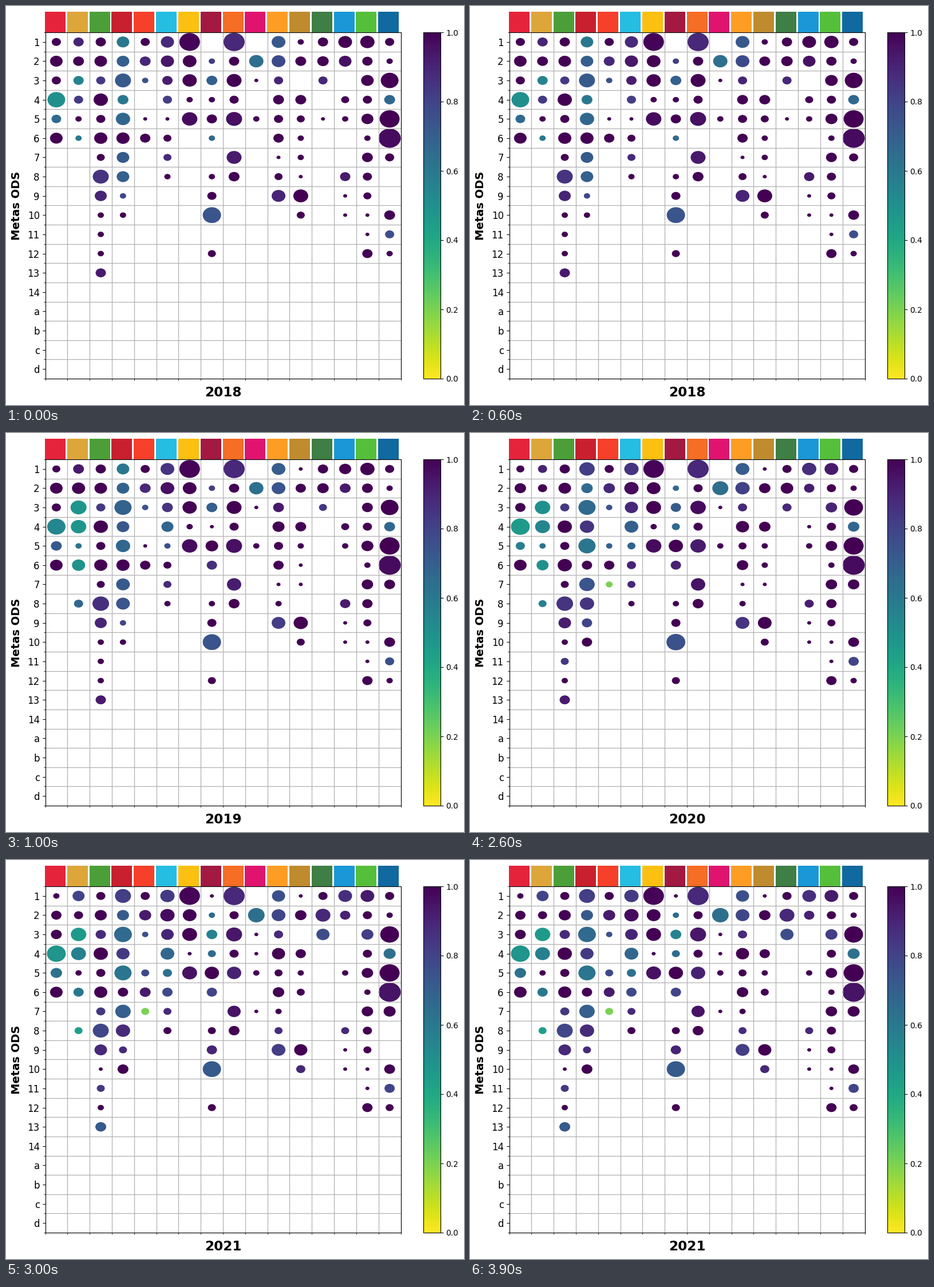
A matplotlib script for the animation above (4500 ms loop, 800 by 697 pixels).

```python
import matplotlib.pyplot as plt
from matplotlib.animation import FuncAnimation
from matplotlib.collections import PatchCollection
from matplotlib.patches import Circle, Rectangle

W, H, DPI = 800, 697, 100
LEFT, RIGHT, TOP, BOTTOM = 68.5, 689.5, 46, 651
COLS, ROWS = 16, 18
CELL = (RIGHT - LEFT) / COLS
FIRST_YEAR, YEARS = 2018, 4
STEP_MS, FRAMES = 500, 9

plt.rcParams["font.family"] = "DejaVu Sans"
goals = []


def goal(color, start, *changes):
    """Register a column: bubble widths by target, then yearly updates.

    A bubble is a width in pixels (value 1), or a (width, value) pair.
    """
    state = dict(enumerate(start, 1))
    history = [state]
    for change in changes:
        state = {**state, **change}
        history.append(state)
    goals.append((color, history))


goal("#e5243b", [16, 22, 16, (31, .5), (17, .66), 22],
     {1: 14, 4: (32, .54), 5: (19, .72)},
     {2: 20, 3: 18, 4: (33, .46), 5: (16, .57)},
     {1: 11, 2: 18, 3: 19, 4: (33, .48), 5: (20, .63)})
goal("#dda63a", [(18, .9), 19, (18, .56), (16, .83), 11, (11, .6)],
     {1: (19, .93), 2: 23, 3: (28, .48), 4: (27, .48), 5: (11, .62),
      6: (23, .49), 8: (16, .67)},
     {1: (16, .9), 2: 16, 3: (27, .5), 4: (26, .55), 6: (21, .5),
      8: (14, .57)},
     {1: (21, .8), 3: (27, .46), 4: (26, .57), 5: 11, 6: (18, .6),
      8: (14, .44)})
goal("#4c9f38", [18, 22, (16, .83), 25, 16, 23, 14, (28, .85), (21, .9),
                 11, 11, 11, (18, .93)],
     {8: (29, .86)},
     {6: 25, 8: (29, .85), 9: (22, .92), 11: (14, .84)},
     {1: 16, 2: 21, 3: (18, .88), 6: 23, 7: (16, .84), 8: (28, .79),
      9: (22, .89), 10: 7, 13: (19, .72)})
goal("#c9202f", [(22, .6), (22, .7), (28, .72), (19, .6), (25, .67), 23,
                 (22, .72), (22, .7), (11, .79), 11],
     {2: (22, .69), 3: (30, .69), 4: (22, .73), 7: (24, .72), 8: (24, .74)},
     {1: (27, .82), 2: (20, .66), 3: (30, .66), 4: (25, .85), 5: (30, .61),
      6: 18, 7: (27, .74), 8: (25, .85), 9: (18, .8), 10: 18},
     {1: (28, .82), 2: (21, .72), 3: (31, .66), 4: (23, .83), 7: (27, .7),
      8: (25, .88), 9: (14, .88), 10: 19})
goal("#f6402b", [16, (19, .89), (11, .75), 0, 7, 18],
     {},
     {2: (20, .89), 5: (11, .69), 7: (12, .2)},
     {2: (21, .93), 5: (14, .78), 6: (19, .93), 7: (14, .2)})
goal("#26bde2", [(23, .88), (23, .94), (18, .92), (16, .82), 7, 14,
                 (14, .88), 11],
     {1: (24, .85), 2: (24, .96), 3: (19, .85), 4: (21, .68), 5: (11, .76)},
     {1: (25, .85), 2: (25, .97), 3: (23, .89), 4: (24, .7), 5: (14, .68),
      6: (16, .9)},
     {1: (25, .83), 3: (22, .9), 4: (24, .67), 5: (16, .63), 6: (18, .78),
      8: 14})
goal("#fcc010", [(36, .99), 24, 25, 11, (27, .97)],
     {}, {3: 26}, {4: 7, 5: (26, .96)})
goal("#a21942", [0, (11, .82), (19, .7), 11, 18, (11, .66), 0, 11, 16,
                 (32, .74), 0, 14],
     {4: 7, 5: 22, 6: (18, .86)},
     {2: (11, .66), 3: (18, .72), 4: (14, .66), 5: 25, 6: (18, .91),
      10: (33, .75)},
     {1: 7, 3: (19, .56), 6: (18, .8), 8: 14, 9: (18, .9), 10: (32, .72)})
goal("#f66d25", [(37, .89), 18, 26, 16, (28, .96), 0, (26, .93), 19],
     {7: (25, .92)},
     {2: 16, 3: (27, .97), 5: (27, .93), 7: (25, .95)},
     {3: (28, .94), 5: (25, .91), 7: (23, .95)})
goal("#e0146f", [0, (25, .64), 7, 0, 11],
     {}, {2: (28, .64)}, {2: (29, .64), 4: 7, 7: 7})
goal("#fd9d24", [(24, .73), (24, .78), (16, .9), 19, 16, 18, 7, 14, (24, .9)],
     {1: (24, .71), 2: (24, .74), 3: (19, .93), 4: 21, 8: 11, 9: (24, .82)},
     {2: (25, .81), 3: (16, .89), 4: 23, 5: 14, 6: 20, 9: (24, .85)},
     {1: (23, .76), 2: (24, .79), 3: (16, .88), 7: 11, 8: (14, .87),
      9: (24, .82)})
goal("#bf8b2e", [11, 19, 0, 19, 14, 11, 11, 7, 26, 14],
     {1: 7, 2: 18, 5: 11, 6: 7, 7: 7, 8: 0, 9: 25},
     {2: 20, 4: 20, 6: 11, 9: 24},
     {4: 18, 6: 14, 7: 0, 9: 23, 10: (16, .89)})
goal("#3f7e44", [18, 20, (16, .89), 0, 7],
     {3: (14, .84), 5: 0},
     {1: 16, 2: 22, 3: (16, .89)},
     {2: (26, .89), 3: (23, .77)})
goal("#1a97d6", [24, (22, .96), 0, 14, 11, 0, 0, (18, .93), 7, 7],
     {1: 21, 2: (19, .93)},
     {1: (25, .87), 2: (18, .92), 4: 7, 8: (16, .92)},
     {1: (24, .87), 2: (18, .91), 4: 0, 8: (14, .89)})
goal("#56bf3a", [25, 18, 22, 16, 21, 11, 19, 16, 14, 7, 7, 18],
     {2: 19, 3: 19, 7: 20, 8: 18},
     {1: (24, .93), 2: 16, 3: (20, .9), 5: 20},
     {3: (21, .82), 8: 16})
goal("#10699f", [16, 11, 31, (19, .67), 35, (39, .97), 16, 0, 0, 19,
                 (16, .76), 11],
     {7: 19},
     {3: 33, 4: (20, .67), 7: 20, 11: (18, .8)},
     {4: (21, .64), 6: (39, .95), 7: 21, 12: 14})


def pixel_axes(left, top, right, bottom):
    return fig.add_axes([left / W, 1 - bottom / H,
                         (right - left) / W, (bottom - top) / H])


def bubbles(year):
    """Circles and values of one year, in cell units."""
    circles, values = [], []
    for col, (_, history) in enumerate(goals):
        for target, bubble in history[year].items():
            width, value = bubble if isinstance(bubble, tuple) else (bubble, 1)
            if width:
                center = (col + .5, target - .5)
                circles.append(Circle(center, min(width / CELL, 1) / 2))
                values.append(value)
    return circles, values


fig = plt.figure(figsize=(W / DPI, H / DPI), dpi=DPI, facecolor="white")

ax = pixel_axes(LEFT, TOP, RIGHT, BOTTOM)
ax.set_xlim(0, COLS)
ax.set_ylim(ROWS, 0)
ax.set_xticks([])
ax.set_xticks(range(COLS + 1), minor=True)
ax.set_yticks([row + .5 for row in range(ROWS)],
              [str(n) for n in range(1, 15)] + list("abcd"), fontsize=12)
ax.set_yticks(range(ROWS + 1), minor=True)
ax.grid(which="minor", color="#b0b0b0", linewidth=.9)

for col, (color, _) in enumerate(goals):
    left = LEFT - .5 + col * CELL
    fig.add_artist(Rectangle((left / W, 1 - 46 / H), 36 / W, 36 / H,
                             facecolor=color, edgecolor="none"))

dots = PatchCollection([], cmap="viridis_r")
dots.set_clim(0, 1)
ax.add_collection(dots, autolim=False)

fig.text(19 / W, 1 - 349 / H, "Metas ODS", rotation=90, fontsize=14,
         weight="bold", ha="center", va="center")
year_label = fig.text(379 / W, 1 - 682 / H, "", fontsize=16.7,
                      weight="bold", ha="center", va="baseline")

bar = fig.colorbar(dots, cax=pixel_axes(728.5, TOP, 758.5, BOTTOM))
bar.set_ticks([0, .2, .4, .6, .8, 1])
bar.ax.tick_params(labelsize=10)


def update(frame):
    year = min(frame * STEP_MS // 1000, YEARS - 1)
    circles, values = bubbles(year)
    dots.set_paths(circles)
    dots.set_array(values)
    year_label.set_text(str(FIRST_YEAR + year))
    return dots, year_label


anim = FuncAnimation(fig, update, frames=FRAMES, interval=STEP_MS,
                     repeat=True, repeat_delay=0, blit=False)
plt.show()
```
